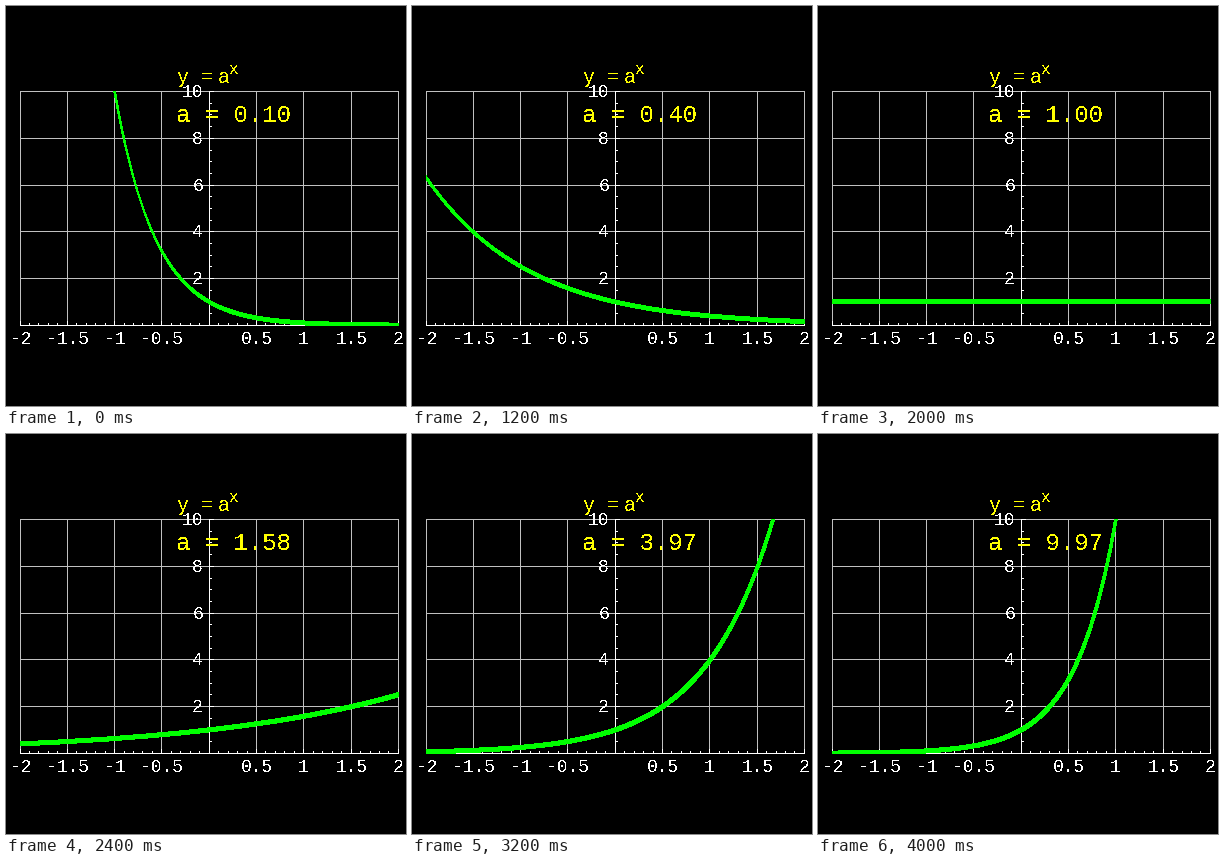
A matplotlib script for the animation above (4.2 s loop, 400 by 400 pixels).

```python
import numpy as np
import matplotlib.pyplot as plt
from matplotlib.animation import FuncAnimation
from matplotlib.patches import Rectangle

SIZE, DPI = 400, 100
FRAMES, INTERVAL = 21, 200
PX = 72 / DPI

# Plot geometry in stage pixels
X0, Y0 = 202.7, 319
X_UNIT, Y_UNIT = 94.6, 23.4
LEFT, RIGHT, TOP = 14, 392, 85
GRID, AXIS, TITLE, CURVE = "#c0c0c0", "#ffffff", "#ffff00", "#00ff00"


def to_px(x, y):
    return X0 + X_UNIT * x, Y0 - Y_UNIT * y


def column(x):
    return round(X0 + X_UNIT * x)


def row(y):
    return round(Y0 - Y_UNIT * y)


fig = plt.figure(figsize=(SIZE / DPI, SIZE / DPI), dpi=DPI, facecolor="black")
ax = fig.add_axes([0, 0, 1, 1])
ax.set_xlim(0, SIZE)
ax.set_ylim(SIZE, 0)
ax.axis("off")


def bar(x, y, width, height, color, zorder):
    ax.add_patch(Rectangle((x, y), width, height, facecolor=color, linewidth=0,
                           antialiased=False, zorder=zorder))


def label(x, y, text, size, color=AXIS, ha="center"):
    return ax.text(x, y, text, color=color, fontsize=size * PX, ha=ha,
                   va="baseline", family="Liberation Mono",
                   antialiased=False, zorder=6)


for x in np.arange(-2, 2.1, 0.5):
    bar(column(x), TOP, 1, Y0 - TOP + 1, GRID, 1)
    if x:
        label(column(x) + 0.5, 338, f"{x:g}", 18)

for y in range(0, 11, 2):
    bar(LEFT, row(y), RIGHT - LEFT + 1, 1, GRID, 1)
    if y:
        text = str(y)
        label(197 - 5.4 * len(text), row(y) + 6, text, 18)

# Axes with ticks pointing inwards
bar(LEFT, Y0, RIGHT - LEFT + 1, 1, AXIS, 2)
bar(column(0), TOP, 1, Y0 - TOP + 1, AXIS, 2)
for i in range(-20, 21):
    length = 4 if i % 5 == 0 else 2
    bar(column(i / 10), Y0 - length, 1, length, AXIS, 2)
for i in range(1, 21):
    length = 4 if i % 4 == 0 else 2
    bar(column(0) + 1, row(i / 2), length, 1, AXIS, 2)

label(177, 77, "y", 20, TITLE)
label(201, 77, "=", 20, TITLE)
label(217.5, 77, "a", 20, TITLE)
label(228.5, 68, "x", 16, TITLE)
readout = label(169.5, 115.5, "", 24, TITLE, ha="left")

# A slanted pen: thin on steep descents, broad everywhere else
clip = Rectangle((LEFT, TOP), RIGHT - LEFT + 1, Y0 - TOP + 1,
                 transform=ax.transData)
pen = np.linspace(0, 1, 7)
strokes = []
for _ in pen:
    stroke, = ax.plot([], [], color=CURVE, linewidth=PX, antialiased=False, zorder=4)
    stroke.set_clip_path(clip)
    strokes.append(stroke)

xs = np.linspace(-2.02, 2.02, 405)


def update(frame):
    a = 0.1 * 99.7 ** (frame / (FRAMES - 1))
    px, py = to_px(xs, a ** xs)
    for t, stroke in zip(pen, strokes):
        stroke.set_data(px + t, py - 1.2 + 3 * t)
    readout.set_text(f"a = {a:.2f}")
    return [*strokes, readout]


anim = FuncAnimation(fig, update, frames=FRAMES, interval=INTERVAL,
                     repeat=True, repeat_delay=0, blit=False)
plt.show()
```
